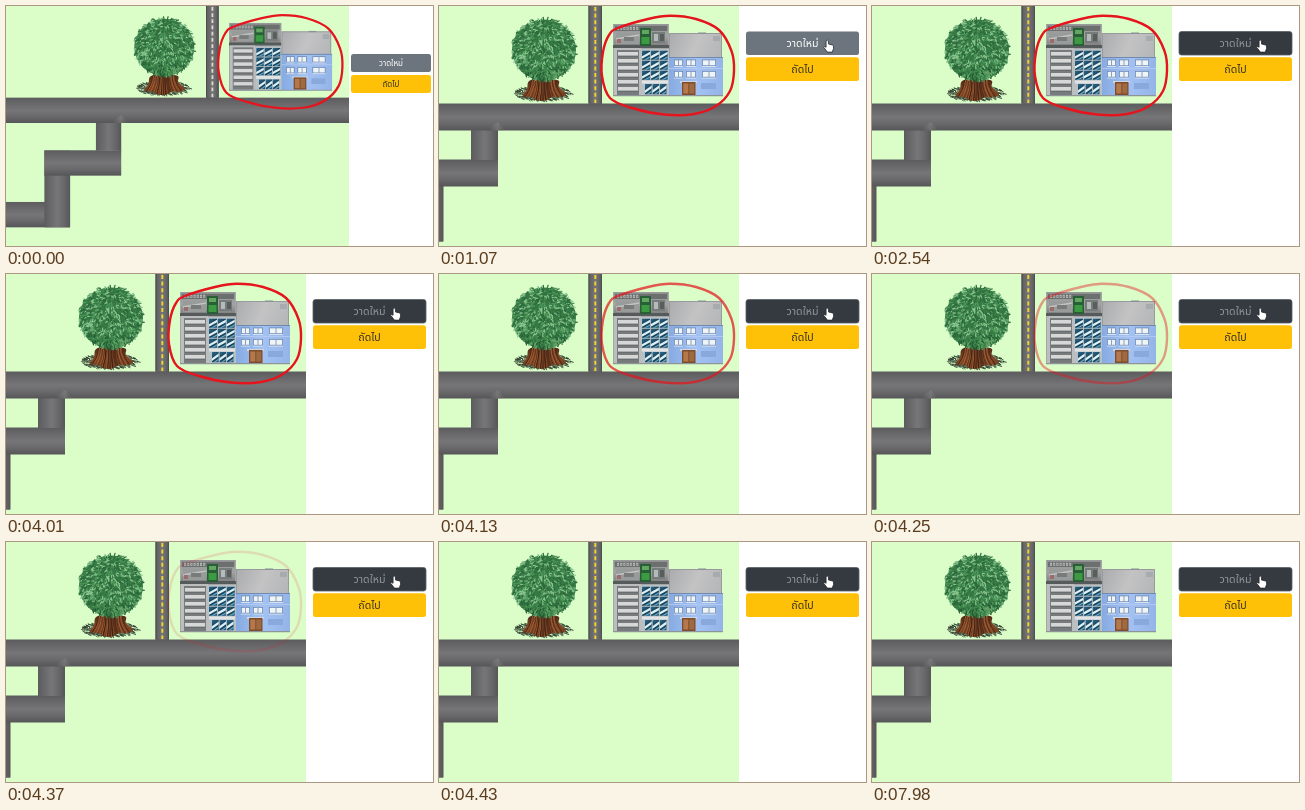
These frames come from a looping animation (427 by 240 pixels, 8000 ms). An HTML page with a canvas:

```html
<!DOCTYPE html>
<html lang="th">
<head>
<meta charset="utf-8">
<style>
html, body { margin: 0; width: 100%; height: 100%; overflow: hidden; background: #fff; }
canvas { display: block; width: 427px; height: 240px; }
</style>
</head>
<body>
<canvas id="stage"></canvas>
<script>
const W = 427, H = 240, LOOP = 8000;
const canvas = document.getElementById('stage');
const c = canvas.getContext('2d');
const dpr = window.devicePixelRatio || 1;
canvas.width = W * dpr;
canvas.height = H * dpr;

let seed = 1;
function rand() {
  seed = (seed * 16807) % 2147483647;
  return seed / 2147483647;
}

function rect(x, y, w, h, fill) {
  c.fillStyle = fill;
  c.fillRect(x, y, w, h);
}

function ramp(x0, y0, x1, y1, ...colors) {
  const g = c.createLinearGradient(x0, y0, x1, y1);
  colors.forEach((col, i) => g.addColorStop(i / (colors.length - 1), col));
  return g;
}

function line(x0, y0, x1, y1, color, width) {
  c.strokeStyle = color;
  c.lineWidth = width;
  c.beginPath();
  c.moveTo(x0, y0);
  c.lineTo(x1, y1);
  c.stroke();
}

function clipped(path, draw) {
  c.save();
  c.beginPath();
  path();
  c.clip();
  draw();
  c.restore();
}

// Closed Catmull-Rom curve through all points
function smooth(pts) {
  const n = pts.length, at = i => pts[(i + n) % n];
  c.moveTo(...pts[0]);
  for (let i = 0; i < n; i++) {
    const [a, b, d, e] = [at(i - 1), at(i), at(i + 1), at(i + 2)];
    c.bezierCurveTo(b[0] + (d[0] - a[0]) / 6, b[1] + (d[1] - a[1]) / 6,
      d[0] - (e[0] - b[0]) / 6, d[1] - (e[1] - b[1]) / 6, d[0], d[1]);
  }
  c.closePath();
}

function road(x, y, w, h, upright) {
  const end = upright ? [x + w, y] : [x, y + h];
  rect(x, y, w, h, ramp(x, y, ...end, '#5c5c5e', '#69696b', '#767678', '#69696b', '#565658'));
}

function roads(dash) {
  road(149.5, -2, 13.5, 100, true);
  line(150, 0, 150, 97, '#4c4c4c', 1);
  line(162.5, 0, 162.5, 97, '#505050', 1);
  c.setLineDash([4, 2.6]);
  line(156.3, 1, 156.3, 97, dash, 1.9);
  c.setLineDash([]);

  road(-66, 208.5, 70, 27);
  road(-23, 154, 27.5, 81.5, true);
  road(-23, 153.5, 82, 27);
  road(32, 123, 27, 31, true);
  road(-70, 97.5, 375, 27);
  c.fillStyle = ramp(50, 0, 67, 0, 'rgba(125,125,125,0)', 'rgba(132,132,132,.55)', 'rgba(110,110,110,0)');
  c.beginPath();
  c.moveTo(46, 124.5);
  c.lineTo(59, 116);
  c.lineTo(67, 124.5);
  c.fill();
}

function tree() {
  seed = 77;
  for (let i = 0; i < 420; i++) {
    const a = rand() * 6.283, r = Math.sqrt(rand());
    const x = 104 + Math.cos(a) * r * 28, y = 87 + Math.sin(a) * r * 8;
    line(x - 1, y, x + rand() * 3, y + 1.2, ['#253526', '#3b4c38', '#667a60'][i % 3], 0.9);
  }

  const trunk = () => smooth([[92, 74], [118, 74], [120, 81], [127, 88], [121, 91], [113, 91],
    [106, 94.5], [98, 94], [92, 91], [84, 90], [88, 83]]);
  clipped(trunk, () => {
    rect(78, 70, 54, 28, ramp(0, 74, 0, 95, '#4e2c18', '#824724', '#6b3a1d'));
    for (let i = 0; i < 46; i++) {
      const x = 92 + rand() * 25;
      c.strokeStyle = ['#3c2012', '#b0673a', '#59301c'][i % 3];
      c.lineWidth = 0.8;
      c.beginPath();
      c.moveTo(x, 74);
      c.quadraticCurveTo(x, 84, x + (x - 104) * 0.9, 95);
      c.stroke();
    }
  });

  c.fillStyle = '#367944';
  c.beginPath();
  c.ellipse(105, 44, 32, 30.5, 0, 0, 7);
  c.fill();
  for (let i = 0; i < 800; i++) {
    const a = rand() * 6.283, r = Math.sqrt(rand());
    const x = 105 + Math.cos(a) * r * 32.5, y = 43.5 + Math.sin(a) * r * 31.5;
    const turn = Math.atan2(y - 20, (x - 105) * 1.4) + rand() * 1.6 - 0.8;
    const dx = Math.cos(turn) * 1.6, dy = Math.sin(turn) * 1.6;
    const tones = y > 62 ? ['#245b35', '#408a4c', '#69a96e'] : ['#2c683b', '#4d9759', '#8ac690'];
    line(x - dx, y - dy, x + dx, y + dy, tones[i % 3], 1.2);
  }
}

// Dark panes, each crossed by a bright slanted reflection
function glass(x, y, cols, rows, w, h) {
  for (let i = 0; i < cols * rows; i++) {
    const px = x + (i % cols) * w, py = y + Math.floor(i / cols) * h;
    clipped(() => c.rect(px, py, w - 0.7, h - 0.7), () => {
      rect(px, py, w, h, ramp(px, py, px + w, py + h, '#2d6d91', '#173b52', '#276180'));
      line(px - 1, py + h * 0.75, px + w + 1, py + h * 0.15, '#dcf1f6', 2.3);
      line(px - 1, py + h * 1.15, px + w + 1, py + h * 0.55, '#66a9c8', 1.2);
    });
  }
}

function buildings() {
  rect(174, 18, 56, 72, '#a4a6a7');
  rect(175, 18.5, 54, 23, ramp(175, 18, 175, 42, '#8b8e8d', '#a4a4a4', '#777'));
  rect(176, 20, 52, 5, '#6b6f6e');
  for (let i = 0; i < 7; i++) {
    rect(178 + i * 3.2, 20.8, 2, 3, '#bdc0be');
    rect(178.6 + i * 3.2, 21.8, 0.8, 1, '#5c6060');
  }
  rect(177, 27, 23, 11, '#979b9a');
  line(177, 33, 200, 29, '#c2c3c2', 1.5);
  rect(178, 33, 4, 4, '#9c6b6b');
  rect(185, 31, 10, 4, '#777b7a');
  rect(213, 26, 13, 11, '#767c7a');
  rect(215, 28, 4, 7, '#b5baba');
  rect(221, 28, 4, 7, '#595e5c');
  rect(174, 39, 56, 3, '#555b5b');
  rect(201, 22, 11, 18, '#285f36');
  rect(203, 24, 7, 4, '#62a661');
  rect(202.5, 31, 8, 7, '#3b9a42');

  rect(175, 42, 27, 48, '#bcbebe');
  rect(178, 44, 22, 45, '#777b7c');
  for (let y = 46; y < 88; y += 7) {
    rect(179, y, 20, 3.8, '#d6d8d8');
    line(179, y + 4.2, 199, y + 4.2, '#5f6566', 0.8);
  }
  rect(202, 43, 28, 47, '#b9c0c3');
  glass(203, 44.5, 3, 3, 8.8, 10);
  rect(203, 74.5, 26, 3, '#e1e4e4');
  glass(206, 78, 3, 1, 7.4, 11);

  rect(230, 27, 53, 25, ramp(230, 27, 283, 51, '#aaabad', '#c3c3c4', '#b4b5b7'));
  c.strokeStyle = '#989a9e';
  c.lineWidth = 1;
  c.strokeRect(230.5, 27.5, 52, 24);
  rect(259, 26.5, 8, 1.4, '#8b9198');
  rect(274, 30, 7, 5, '#a8abad');
  rect(230, 51, 54, 38.5, ramp(230, 0, 284, 0, '#86abe2', '#a3c2f3', '#94b4e8'));
  line(230, 51.5, 284, 51.5, '#7089ad', 1);
  line(230, 62.5, 284, 62.5, '#bacdf2', 0.8);
  for (const y of [53.5, 65]) {
    for (const [x, w] of [[235, 9], [247, 10], [263, 14]]) {
      rect(x, y, w, 7, '#6d87b2');
      rect(x + 0.8, y + 0.8, w - 1.6, 5, '#eff4f4');
      line(x + w / 2, y, x + w / 2, y + 6.5, '#86a0c8', 1);
      line(x, y + 7, x + w, y + 7, '#eef4fb', 0.8);
    }
  }
  rect(241, 75, 17, 2, '#d0d6df');
  rect(243, 76, 13.5, 13, '#7d4d2d');
  rect(244.3, 77.5, 5, 10, '#b5784a');
  rect(250.3, 77.5, 5, 10, '#a06a40');
  rect(262, 77, 15, 6, '#89a8dc');
  line(174, 89.7, 284, 89.7, '#8d9599', 1.2);
}

function loop(alpha) {
  c.globalAlpha = alpha;
  c.strokeStyle = '#e5141d';
  c.lineWidth = 2.4;
  c.beginPath();
  smooth([[179, 22], [209, 13], [231, 9.7], [257, 13], [280, 24], [292.5, 45], [295, 65],
    [291, 85], [277, 100], [255, 108], [225, 108.5], [193, 102], [171, 92], [163, 70],
    [164, 46], [170, 29]]);
  c.stroke();
  c.globalAlpha = 1;
}

function button(x, y, w, h, fill, label, ink, size) {
  c.fillStyle = fill;
  c.beginPath();
  c.roundRect(x, y, w, h, 2.5);
  c.fill();
  c.fillStyle = ink;
  c.font = '500 ' + size + 'px "Noto Sans Thai", "Noto Sans", sans-serif';
  c.textAlign = 'center';
  c.textBaseline = 'alphabetic';
  c.fillText(label, x + w / 2, y + h / 2 + size * 0.36);
}

function hand(x, y) {
  c.save();
  c.translate(x, y);
  c.scale(1.12, 1.08);
  c.beginPath();
  c.moveTo(1.5, 7);
  c.lineTo(1.5, 1);
  c.quadraticCurveTo(2.5, -0.4, 3.5, 1);
  c.lineTo(3.7, 4);
  c.lineTo(7, 4.8);
  c.quadraticCurveTo(8.5, 5, 8.2, 8);
  c.lineTo(7, 11.5);
  c.lineTo(2.7, 11.5);
  c.lineTo(-0.6, 7);
  c.quadraticCurveTo(-0.4, 5.5, 1.5, 7);
  c.closePath();
  c.fillStyle = '#fff';
  c.fill();
  c.strokeStyle = '#25282b';
  c.lineWidth = 0.7;
  c.stroke();
  c.restore();
}

function draw(t) {
  const wide = t < 1070, pressed = t >= 2540;
  const step = Math.floor((t - 4010) / 60);
  const alpha = Math.min(1, Math.max(0, 1 - step / 7));
  c.setTransform(dpr, 0, 0, dpr, 0, 0);
  rect(0, 0, W, H, '#fff');
  clipped(() => c.rect(0, 0, wide ? 343 : 300, H), () => {
    rect(0, 0, 343, H, '#dbfec9');
    if (wide) {
      c.translate(223 - 174 / 1.067, 0);
      c.scale(1 / 1.067, 1 / 1.064);
    }
    roads(wide ? '#dedcca' : '#f0d62c');
    tree();
    buildings();
    if (alpha > 0) loop(alpha);
  });

  if (wide) {
    button(345, 48, 80, 18, '#6c757d', 'วาดใหม่', '#fff', 8);
    button(345, 69, 80, 18, '#ffc107', 'ถัดไป', '#343220', 8);
  } else {
    button(307, 25.5, 113, 23.5, pressed ? '#343a40' : '#6c757d', 'วาดใหม่', pressed ? '#92979b' : '#fff', 10.6);
    if (pressed) {
      c.strokeStyle = '#596168';
      c.lineWidth = 0.8;
      c.stroke();
    }
    button(307, 51.2, 113, 23.8, '#ffc107', 'ถัดไป', '#343220', 10.6);
    hand(385.4, 33.7);
  }
}

function tick() {
  draw(performance.now() % LOOP);
  requestAnimationFrame(tick);
}
tick();
</script>
</body>
</html>
```
